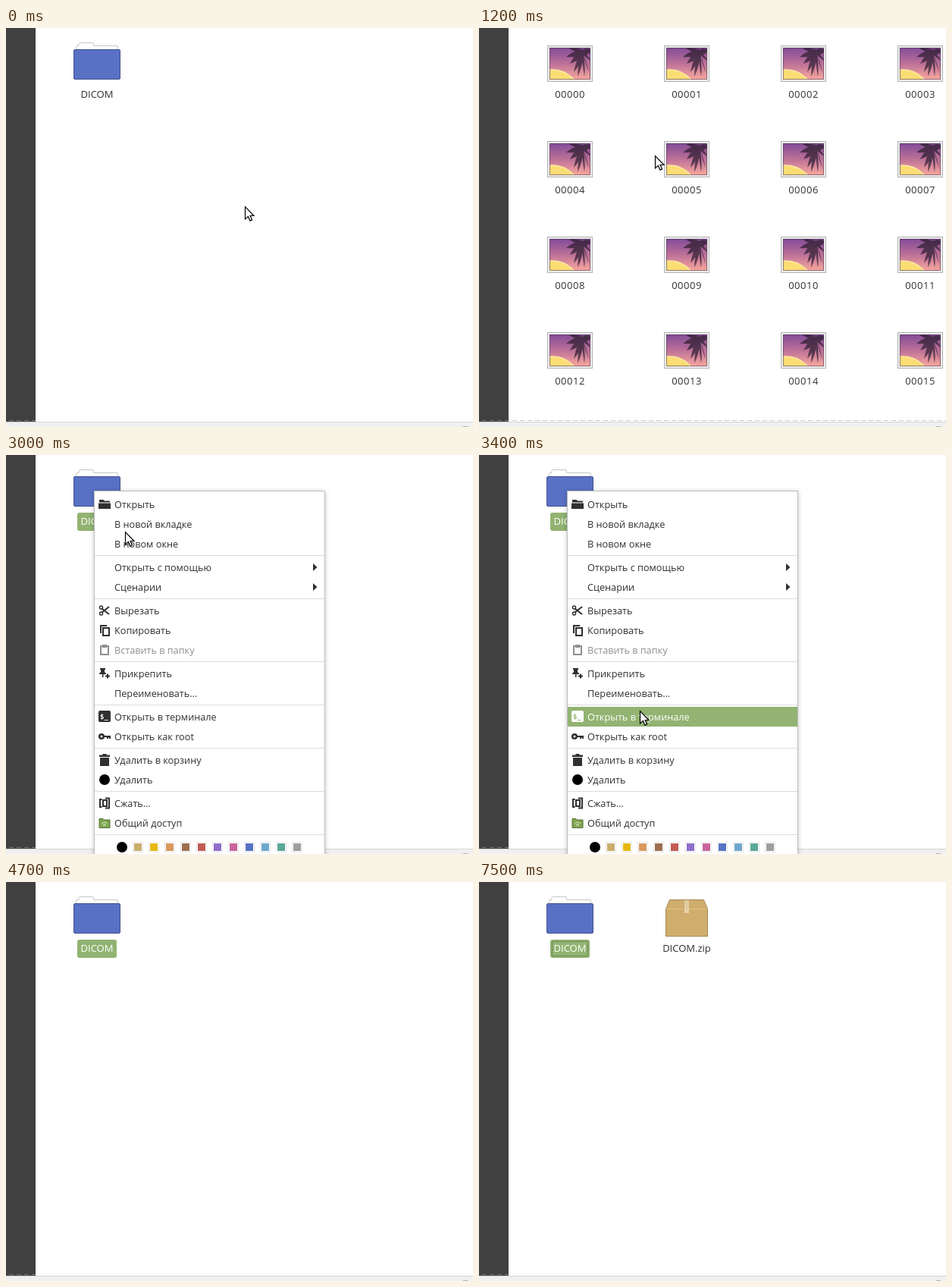
Write an HTML page that moves like this. It is 616 by 526 pixels and loops after 8.2 s.

```html
<!DOCTYPE html>
<html lang="ru">
<head>
<meta charset="utf-8">
<title>DICOM</title>
<style>
  html, body { margin: 0; width: 100%; height: 100%; overflow: hidden; background: #fff; }
  svg { display: block; }
  text { font: 13px "Open Sans", "Noto Sans", sans-serif; fill: #303030; text-anchor: middle; }
  .digits { letter-spacing: .5px; }
  .front { fill: #5971c5; stroke: #40528f; }
  .hover .front { fill: #7b90dc; }
  .green .front { fill: #8bb158; stroke: #698a40; }
  .pill, .focus { visibility: hidden; }
  .selected .pill, .focused .focus { visibility: visible; }
  .selected text { fill: #fff; }
  .row { color: #303030; --hole: #fff; }
  .row text { font-size: 12.7px; fill: currentColor; text-anchor: start; }
  .row .bar { fill: none; }
  .row.off { color: #8f8f8f; }
  .row.on { color: #fff; --hole: #92b372; }
  .row.on .bar { fill: #92b372; }
  .row .fill { fill: currentColor; }
  .row .line { fill: none; stroke: currentColor; stroke-width: 2; }
  .row .hole { fill: none; stroke: var(--hole); stroke-width: 1.8; }
  .menu { filter: drop-shadow(0 1px 3px rgba(0, 0, 0, .22)); }
</style>
</head>
<body>
<svg width="616" height="526" viewBox="0 0 616 526">
  <defs>
    <linearGradient id="sky" x2="0" y2="1">
      <stop stop-color="#824b98"/>
      <stop offset=".5" stop-color="#bd7198"/>
      <stop offset="1" stop-color="#f8a89c"/>
    </linearGradient>
    <linearGradient id="leaf" x2="0" y2="1">
      <stop stop-color="#3f2547"/>
      <stop offset="1" stop-color="#644052"/>
    </linearGradient>
    <clipPath id="photo"><rect x="3" y="3" width="54" height="42"/></clipPath>
    <g id="thumb">
      <rect x=".5" y=".5" width="59" height="47" fill="#ececec" stroke="#b4b4b4"/>
      <g clip-path="url(#photo)">
        <rect x="3" y="3" width="54" height="42" fill="url(#sky)"/>
        <circle cx="7" cy="69" r="37" fill="#fbdd74" stroke="#fdeaa4" stroke-width="1.5"/>
        <path id="palm" fill="url(#leaf)"/>
      </g>
      <rect x="3.5" y="3.5" width="53" height="41" fill="none" stroke="#4a3050" stroke-opacity=".55"/>
    </g>
    <g id="folder">
      <path d="M3.5 10V6q0-1.500 1.500-1.500H7V2q0-1.500 1.500-1.500H25q1.500 0 1.500 1.500V4.500H57q1.500 0 1.500 1.500V10z" fill="#fff" stroke="#c6c6c6"/>
      <rect class="front" x=".5" y="9.500" width="61" height="39" rx="1.500"/>
    </g>
    <g id="delete">
      <circle class="fill" cx="8" cy="8" r="7"/>
      <path class="hole" d="M5.300 5.300l5.400 5.400m0-5.400l-5.400 5.400"/>
    </g>
  </defs>

  <rect width="616" height="526" fill="#fff"/>
  <rect y="519" width="616" height="7" fill="#f0f0f0"/>
  <path d="M0 519.500H616" stroke="#d4d4d4"/>
  <path d="M603 525.500H609" stroke="#b0b0b0"/>
  <rect width="39" height="519" fill="#404040"/>
  <path d="M4 517.500H39" stroke="#767676" stroke-dasharray="6 4"/>

  <g id="photos">
    <path d="M44 517.500H616" stroke="#cbcbcb" stroke-dasharray="6 4"/>
  </g>

  <g id="dicom">
    <use href="#folder" x="89" y="19"/>
    <rect class="pill" x="94" y="76" width="52" height="24" rx="3" fill="#92b372"/>
    <rect class="focus" x="96.500" y="78.500" width="47" height="19" rx="1" fill="none" stroke="#5d7645" stroke-dasharray="2 1"/>
    <text x="120" y="92">DICOM</text>
  </g>

  <g id="temp" class="green">
    <use href="#folder" x="243" y="19"/>
    <text x="274" y="92">.fr-B2Q2HF</text>
  </g>

  <g id="page">
    <path d="M250.500 12.500H285L297.500 25V71.500H250.500z" fill="#f6f6f6" stroke="#b8b8b8"/>
    <path d="M285 12.500V25H297.500z" fill="#dedede" stroke="#b8b8b8"/>
  </g>
  <g id="box">
    <path d="M251.500 23.500H296.500L301.500 35.500V71.500H246.500V35.500z" fill="#d0ad6c" stroke="#a58954"/>
    <path d="M247 35.500H301" stroke="#dfc18a"/>
    <path d="M271 24H277V41H271z" fill="#e3cba0"/>
    <path d="M272.500 36V41M275.500 36V41" stroke="#efdfc0"/>
  </g>
  <text id="zip" x="274" y="92">DICOM.zip</text>

  <g id="menu">
    <rect class="menu" x="116.500" y="47.500" width="304" height="490" fill="#fff" stroke="#bdbdbd"/>
  </g>

  <path id="cursor" d="M.5.700V17l3.900-3.600 2.500 5.700 2.700-1.200-2.500-5.400H12z" fill="#fff" stroke="#000" stroke-width="1.200"/>
</svg>

<script>
const LOOP = 8200, TICK = 100;
const $ = id => document.getElementById(id);
const add = (id, markup) => $(id).insertAdjacentHTML('beforeend', markup);

// Palm: curved fronds hanging from one crown.
const fronds = [[25, 15], [29, 4], [30, 24], [35, 35], [40, 41], [49, 41], [55, 36], [60, 22], [40, -2], [60, 6]];
$('palm').setAttribute('d', fronds.map(([x, y]) => {
  const cx = 46, cy = 9, mx = (x + cx) / 2, my = (y + cy) / 2;
  return `M${cx} ${cy - 3}Q${mx - 2} ${my - 5} ${x} ${y}Q${mx + 3} ${my + 4} ${cx + 2} ${cy + 4}z`;
}).join(''));

for (let i = 0; i < 16; i++) {
  const x = 90 + i % 4 * 154, y = 23 + Math.floor(i / 4) * 126;
  add('photos', `<use href="#thumb" x="${x}" y="${y}"/>
    <text class="digits" x="${x + 30}" y="${y + 69}">${String(i).padStart(5, '0')}</text>`);
}

const fill = d => `<path class="fill" d="${d}"/>`;
const line = d => `<path class="line" d="${d}"/>`;
const hole = d => `<path class="hole" d="${d}"/>`;
const icons = {
  open: fill('M1 2H6.500L8 3.500H15V5.500H1zM0 6.500H16V14H0z'),
  cut: '<g style="stroke-width:1.500">' + line('M4.500 5.500L14 13M4.500 10.500L14 3') +
    '<circle class="line" cx="3.500" cy="4" r="2" style="stroke-width:1.500"/>' +
    '<circle class="line" cx="3.500" cy="12" r="2" style="stroke-width:1.500"/></g>',
  copy: line('M6 5H14V15H6zM3 12V2H11'),
  paste: line('M3 3H13V14H3z') + fill('M5 1H11V5H5z'),
  pin: fill('M2 1H9V3H8V6L10 8V9H6.500V13H5V9H1V8L3 6V3H2z') + line('M12 8.500V14.500M9 11.500H15'),
  term: '<rect class="fill" y="0" width="16" height="15" rx="2"/>' +
    '<text x="2" y="11" style="font:bold 9px \'DejaVu Sans Mono\',monospace;fill:var(--hole)">$_</text>',
  key: '<circle class="line" cx="4" cy="8" r="2.800" style="stroke-width:2.600"/>' +
    fill('M7 7H16V11H14V9.500H13V11H11V9H7z'),
  trash: fill('M5.500 0H10.500V1.500H15V4H1V1.500H5.500zM2 5H14V16H2z'),
  del: '<use href="#delete"/>',
  zip: line('M6 4H11V12H6z') + line('M9 1.500H14V14.500H9M4.500 3H2V13H4.500'),
  share: '<path d="M1 2.500H6L7.500 4H15V14.500H1z" fill="#7fa650" stroke="#557034"/>' +
    '<path d="M4.500 9Q8 5.500 11.500 9M6 11Q8 9 10 11M8 12V13" fill="none" stroke="#e9f2dc"/>'
};

// null is a separator; flags: '>' has a submenu, '-' is disabled.
const items = [
  ['Открыть', 'open'], ['В новой вкладке'], ['В новом окне'], null,
  ['Открыть с помощью', '', '>'], ['Сценарии', '', '>'], null,
  ['Вырезать', 'cut'], ['Копировать', 'copy'], ['Вставить в папку', 'paste', '-'], null,
  ['Прикрепить', 'pin'], ['Переименовать…'], null,
  ['Открыть в терминале', 'term'], ['Открыть как root', 'key'], null,
  ['Удалить в корзину', 'trash'], ['Удалить', 'del'], null,
  ['Сжать…', 'zip'], ['Общий доступ', 'share'], null
];
const ROW = 26, GAP = 5, rows = [];
let top_ = 52;
for (const item of items) {
  if (!item) {
    add('menu', `<path d="M117 ${top_ + 2.5}H420" stroke="#dcdcdc"/>`);
    top_ += GAP;
    continue;
  }
  const [label, icon, flag] = item;
  add('menu', `<g class="row${flag === '-' ? ' off' : ''}">
    <rect class="bar" x="117" y="${top_}" width="303" height="${ROW}"/>
    <g transform="translate(122 ${top_ + 5})">${icons[icon] || ''}</g>
    <text x="143" y="${top_ + 18}">${label}</text>
    ${flag === '>' ? fill(`M405 ${top_ + 8}l5.500 5-5.500 5z`) : ''}</g>`);
  rows.push({ el: $('menu').lastElementChild, top: top_ });
  top_ += ROW;
}
add('menu', '<g class="row" transform="translate(145 509)"><use href="#delete"/></g>');
'c9ad6b e6b80f d9995c 9c7050 c25c55 8f6ecb c9649c 5673c4 6fa8cc 5aa898 9e9e9e'.split(' ').forEach((c, i) =>
  add('menu', `<rect x="${169.5 + i * 21}" y="512.500" width="9" height="9" fill="#${c}" stroke="#${c}"/>
    <rect x="${167.5 + i * 21}" y="510.500" width="13" height="13" fill="none" stroke="#e6e6e6"/>`));

// Pointer waypoints: time, x, y.
const track = [
  [0, 315, 235], [100, 315, 235], [600, 120, 52], [800, 120, 52], [1200, 232, 168], [2400, 232, 168],
  [2800, 116, 47], [2900, 116, 47], [3200, 240, 210], [3300, 225, 285], [3400, 212, 337], [3800, 196, 441],
  [3900, 196, 441], [4100, 191, 448], [4400, 191, 448], [4600, 391, 180], [7399, 561, 3], [LOOP, 561, 3]
];
function pointer(t) {
  const i = track.findIndex(k => k[0] > t);
  const [t0, x0, y0] = track[i - 1], [t1, x1, y1] = track[i];
  const p = (t - t0) / (t1 - t0);
  return [Math.round(x0 + (x1 - x0) * p), Math.round(y0 + (y1 - y0) * p)];
}

const show = (id, on) => { $(id).style.display = on ? '' : 'none'; };

function render(ms) {
  const t = Math.floor(ms % LOOP / TICK) * TICK;
  const within = (a, b) => t >= a && t < b;
  const [x, y] = pointer(t);
  const menu = within(2900, 4300);
  const over = t < 4300 && !menu && x >= 89 && x < 151 && y >= 19 && y < 70;

  show('cursor', t < 4700 || within(7400, 7500));
  $('cursor').setAttribute('transform', `translate(${x} ${y})`);
  show('photos', within(900, 2200));
  show('dicom', !within(800, 2400));
  const state = $('dicom').classList;
  state.toggle('hover', over || within(4300, 4500));
  state.toggle('selected', within(600, 800) || t >= 2800);
  state.toggle('focused', t >= 6300);
  show('menu', menu);
  for (const { el, top } of rows) el.classList.toggle('on', t >= 3300 && y >= top && y < top + ROW && !el.classList.contains('off'));
  show('temp', within(5800, 6100));
  show('page', within(6100, 6300));
  show('box', t >= 6300);
  show('zip', t >= 6100);
}

const start = performance.now();
function loop() {
  render(performance.now() - start);
  requestAnimationFrame(loop);
}
loop();
</script>
</body>
</html>
```
